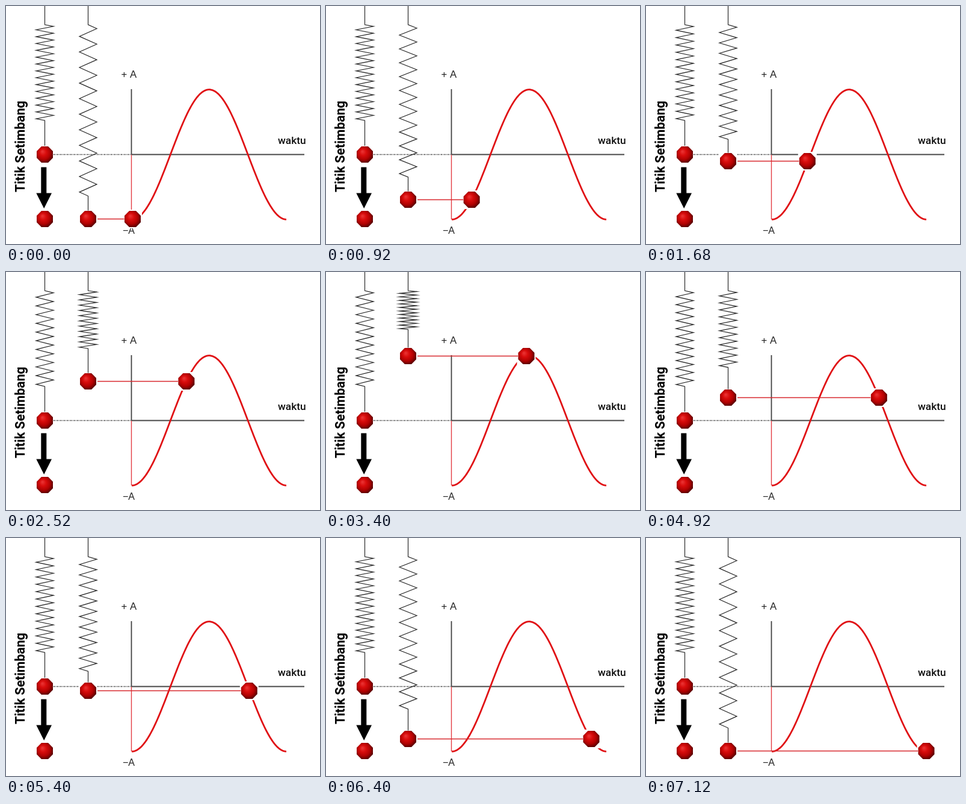
These frames come from a looping animation (522x395 px, 7.2 s). An HTML page with a canvas:

```html
<!DOCTYPE html>
<html lang="id">
<head>
<meta charset="utf-8">
<title>Gerak harmonik</title>
<style>
html, body { margin: 0; width: 100%; height: 100%; overflow: hidden; background: #fff; }
canvas { display: block; }
</style>
</head>
<body>
<canvas id="stage" width="522" height="395"></canvas>
<script>
const c = document.getElementById('stage').getContext('2d');
const LOOP = 7200, STEP = 40, LAST = 7120;
const MID = 246.5, AMP = 107.8, LEFT = 209, RIGHT = 466.5;
const REST_X = 64.5, SPRING_X = 136.5;
const TRACK = [[0, 210.5], [1680, 268.3], [3400, 333], [4400, 369], [5400, 404.3], [6400, 441], [LAST, 466]];

function line(points, color, width, dash = []) {
  c.beginPath();
  points.forEach(([x, y]) => c.lineTo(x, y));
  c.strokeStyle = color;
  c.lineWidth = width;
  c.setLineDash(dash);
  c.stroke();
  c.setLineDash([]);
}

function spring(x, tip, end, turns) {
  const top = 31, pitch = (tip - top) / turns;
  const points = [[x, 0], [x, top]];
  for (let i = 0; i < turns; i++) {
    points.push([x + 14.5, top + (i + 0.25) * pitch], [x - 14.5, top + (i + 0.75) * pitch]);
  }
  points.push([x, tip], [x, end]);
  line(points, '#2a2a2a', 1.2);
}

function ball(x, y) {
  const g = c.createRadialGradient(x - 4, y - 5, 1, x - 1, y - 1, 16);
  g.addColorStop(0, '#e83030');
  g.addColorStop(0.3, '#d80c0c');
  g.addColorStop(0.65, '#b00202');
  g.addColorStop(1, '#480000');
  c.beginPath();
  for (let i = 0; i < 8; i++) {
    const a = (i + 0.5) * Math.PI / 4;
    c.lineTo(x + 14.6 * Math.cos(a), y + 14.6 * Math.sin(a));
  }
  c.closePath();
  c.fillStyle = g;
  c.fill();
}

function label(text, x, y, font, color) {
  c.font = font;
  c.fillStyle = color;
  c.fillText(text, x, y);
}

function clear(x, y) {
  c.fillStyle = '#fff';
  c.fillRect(x - 15.5, y - 15.5, 31, 31);
}

function arrow() {
  c.fillStyle = '#000';
  c.fillRect(58.3, 267.5, 9, 44);
  c.beginPath();
  c.moveTo(50.3, 310.5);
  c.lineTo(76, 310.5);
  c.lineTo(63.2, 336);
  c.fill();
}

function wave() {
  const points = [];
  for (let x = LEFT; x <= RIGHT; x++) {
    points.push([x, MID + AMP * Math.cos((x - LEFT) / (RIGHT - LEFT) * 2 * Math.PI)]);
  }
  c.lineJoin = 'round';
  line(points, '#e01014', 2.8);
  c.lineJoin = 'miter';
}

function trackX(t) {
  let i = 1;
  while (i < TRACK.length - 1 && t > TRACK[i][0]) i++;
  const [t0, x0] = TRACK[i - 1], [t1, x1] = TRACK[i];
  return x0 + (x1 - x0) * (t - t0) / (t1 - t0);
}

function draw(t) {
  const phase = t / LAST * 2 * Math.PI;
  const x = trackX(t);
  const y = Math.floor(246 + 107.5 * Math.cos(phase) + 2 * Math.sin(phase) ** 2) + 0.5;
  const level = Math.max(0, Math.min(7, Math.round((y - 139) / 31)));

  c.fillStyle = '#fff';
  c.fillRect(0, 0, 522, 395);

  line([[79, MID], [208, MID]], '#333', 1.3, [2, 1.3, 1, 1.3]);
  line([[208, MID], [496, MID]], '#484848', 1.9);
  line([[208.5, 138], [208.5, MID]], '#404040', 1.8);
  line([[208.5, 247], [208.5, 354]], '#e23a40', 1.4);
  wave();
  label('+ A', 191.5, 119, '16.8px "Liberation Sans", Arial, sans-serif', '#222');
  label('−A', 194, 377.5, '16px "Liberation Sans", Arial, sans-serif', '#222');
  label('waktu', 452, 229, '500 17.3px Roboto, sans-serif', '#111');

  c.save();
  c.translate(30.7, 309);
  c.rotate(-Math.PI / 2);
  label('Titik Setimbang', 0, 0, 'bold 21.3px Roboto, sans-serif', '#000');
  c.restore();

  spring(REST_X, 190, 232, 11 + Math.floor(level / 2));
  ball(REST_X, MID);
  ball(REST_X, 353.5);
  arrow();

  clear(SPRING_X, y);
  clear(x, y);
  spring(SPRING_X, 95.5 + 31.4 * level, y - 14, 11);
  if (x - 15 > 152) line([[152, y], [x - 14, y]], '#d8282e', 1.4);
  ball(SPRING_X, y);
  ball(x, y);
}

const start = performance.now();
function frame(now) {
  const t = Math.max(0, now - start) % LOOP;
  draw(Math.min(LAST, Math.floor(t / STEP) * STEP));
  requestAnimationFrame(frame);
}
draw(0);
requestAnimationFrame(frame);
</script>
</body>
</html>
```
